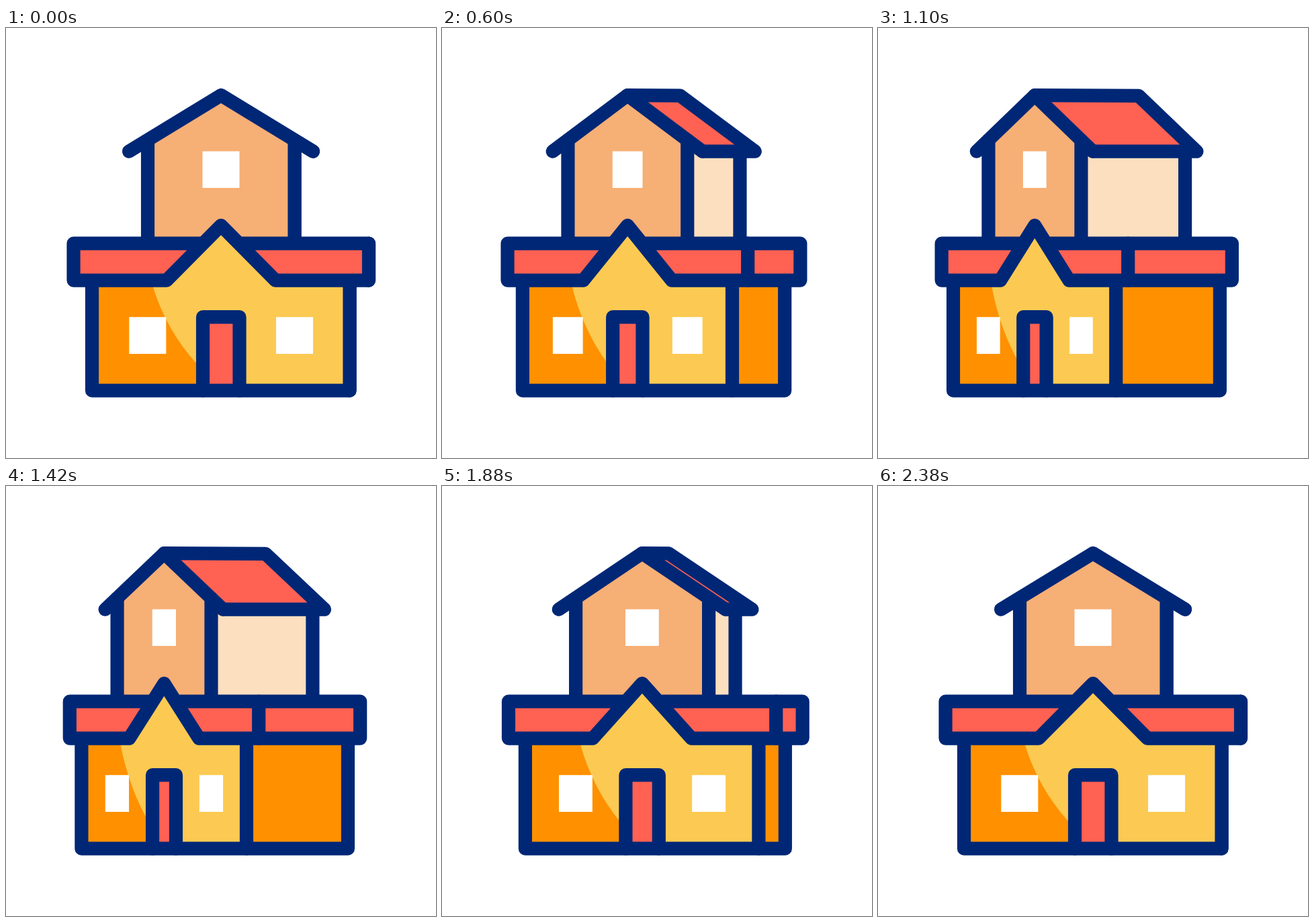
Recreate the animation shown at these times as an HTML page with a canvas. Size 640 by 640 pixels, loop 2400 ms.

```html
<!DOCTYPE html>
<html>
<head>
<meta charset="utf-8">
<title>Turning house</title>
<style>
html, body { margin: 0; width: 100%; height: 100%; overflow: hidden; background: #fff; }
canvas { display: block; width: 640px; height: 640px; }
</style>
</head>
<body>
<canvas id="stage" width="640" height="640"></canvas>
<script>
const ctx = document.getElementById('stage').getContext('2d');
const LOOP = 2400, START = 5, TURN = 1190;
const NAVY = '#002776', RED = '#ff6152', ORANGE = '#ff9100', YELLOW = '#fcca52',
  PEACH = '#f6af75', CREAM = '#fcdfbf', WHITE = '#fff';

// cubic-bezier(.75, 0, .25, 1), solved by bisection
function ease(t) {
  if (t <= 0) return 0;
  if (t >= 1) return 1;
  let lo = 0, hi = 1;
  for (let i = 0; i < 24; i++) {
    const s = (lo + hi) / 2, r = 1 - s;
    const x = 2.25 * s * r * r + 0.75 * s * s * r + s * s * s;
    if (x < t) lo = s; else hi = s;
  }
  return lo * lo * (3 - 2 * lo);
}

function turnAt(ms) {
  const t = (ms - START) / TURN;
  return t < 1 ? ease(t) : 1 - ease(t - 1);
}

function trace(points) {
  ctx.beginPath();
  points.forEach(([x, y]) => ctx.lineTo(x, y));
}

function fill(color, ...points) {
  trace(points);
  ctx.fillStyle = color;
  ctx.fill();
}

function line(...points) {
  trace(points);
  ctx.stroke();
}

function draw(p) {
  // Each facade narrows to 63 % while the two slide apart.
  const front = (x, y) => [x + p * (31.3 - 0.37 * x), y];
  const back = (x, y) => [x + p * (186.6 - 0.37 * x), y];
  const pane = (x, y) => fill(WHITE, front(x, y), front(x + 55, y), front(x + 55, y + 54.7), front(x, y + 54.7));

  ctx.fillStyle = WHITE;
  ctx.fillRect(0, 0, 640, 640);
  ctx.strokeStyle = NAVY;
  ctx.lineWidth = 20.2;
  ctx.lineCap = ctx.lineJoin = 'round';

  // upper floor, side
  fill(CREAM, front(429.5, 184), back(429.5, 184), back(429.5, 320.5), front(429.5, 320.5));
  line(back(429.5, 184), back(429.5, 320.5));
  const ridge = [front(320, 100.2), back(320, 100.2 + 0.7 * p), back(457, 183.7), front(457, 183.7)];
  fill(RED, ...ridge);
  line(...ridge);

  // upper floor, front
  fill(PEACH, front(211, 320.5), front(211, 167), front(320, 100.2), front(429.5, 167), front(429.5, 320.5));
  line(front(211, 320.5), front(211, 167));
  line(front(429.5, 320.5), front(429.5, 167));
  line(front(183, 183.7), front(320, 100.2), front(457, 183.7));
  pane(292.5, 183.4);

  // ground floor, side
  fill(ORANGE, front(511.5, 375.5), back(511.5, 375.5), back(511.5, 539.7), front(511.5, 539.7));
  line(back(511.5, 375.5), back(511.5, 539.7), front(511.5, 539.7));
  const sideBand = [front(540, 320.6), back(540, 320.6), back(540, 375.6), front(540, 375.6)];
  fill(RED, ...sideBand);
  line(...sideBand);

  // ground floor, front
  fill(YELLOW, front(128, 375.6), front(239, 375.6), front(320, 294), front(401, 375.6),
    front(511.5, 375.6), front(511.5, 539.7), front(128, 539.7));
  trace([front(128, 539.7), front(128, 375.6), front(216, 375.6), front(219, 386)]);
  ctx.quadraticCurveTo(...front(239, 450), ...front(284, 500));
  ctx.lineTo(...front(320, 539.7));
  ctx.fillStyle = ORANGE;
  ctx.fill();
  pane(183.3, 430.2);
  pane(402, 430.2);

  const door = [front(293, 539.7), front(293, 430.2), front(347.5, 430.2), front(347.5, 539.7)];
  fill(RED, ...door);
  line(...door);
  line(front(128, 375.6), front(128, 539.7), front(511.5, 539.7), front(511.5, 375.6));

  fill(RED, front(100.5, 320.6), front(293.5, 320.6), front(239, 375.6), front(100.5, 375.6));
  fill(RED, front(540, 320.6), front(346.5, 320.6), front(401, 375.6), front(540, 375.6));
  line(front(293.5, 320.6), front(100.5, 320.6), front(100.5, 375.6), front(239, 375.6), front(320, 293.8),
    front(401, 375.6), front(540, 375.6), front(540, 320.6), front(346.5, 320.6));
}

const begin = performance.now();
function tick() {
  draw(turnAt((performance.now() - begin) % LOOP));
  requestAnimationFrame(tick);
}
tick();
</script>
</body>
</html>
```
